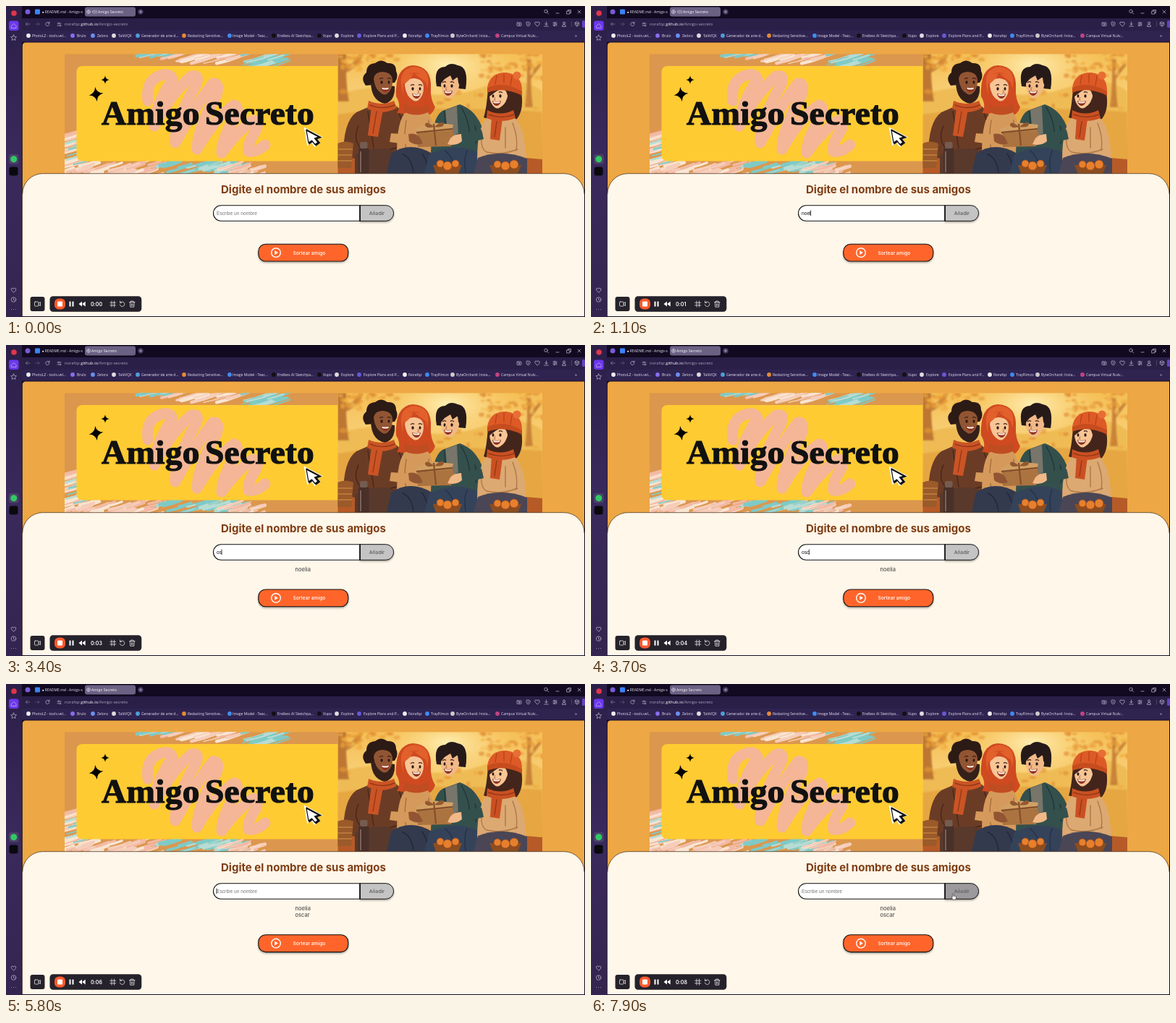
These frames come from a looping animation (800 px wide and 430 px high, 8 s). An HTML page:

```html
<!DOCTYPE html>
<html lang="es">
<head>
<meta charset="utf-8">
<title>Amigo Secreto</title>
<style>
html, body { margin: 0; width: 100%; height: 100%; overflow: hidden; background: #140d24; }
svg { display: block; width: 800px; height: 430px; }
text { white-space: pre; }
.ui { font: 5px "Open Sans", sans-serif; fill: #e9e5f2; }
.inter { font: 500 6.67px Inter, sans-serif; }
.field { font: 6.67px "Liberation Sans", Arial, sans-serif; }
.name { font-size: 7.5px; fill: #555; }
.line { fill: none; stroke: #c4bcd4; stroke-width: .7; stroke-linecap: round; stroke-linejoin: round; }
.rec { fill: none; stroke: #e4e2e6; stroke-width: .8; stroke-linecap: round; stroke-linejoin: round; }
.title { font: bold 47.4px "Liberation Serif", "Times New Roman", serif; letter-spacing: .3px; word-spacing: -5px; fill: #111; stroke: #111; stroke-width: 1.2; }
.fold { fill: none; stroke-width: 1.4; stroke-linecap: round; }
</style>
</head>
<body>
<svg viewBox="0 0 800 430">
<defs>
  <linearGradient id="side" x2="0" y2="1"><stop stop-color="#2b1f48"/><stop offset=".5" stop-color="#3a2a5d"/><stop offset="1" stop-color="#33244f"/></linearGradient>
  <linearGradient id="sky" x2="0" y2="1"><stop stop-color="#f5bf55"/><stop offset=".35" stop-color="#f8cf76"/><stop offset=".65" stop-color="#ecb04a"/><stop offset="1" stop-color="#d98a35"/></linearGradient>
  <radialGradient id="glow"><stop stop-color="#ffeeb2"/><stop offset="1" stop-color="#fbd67e" stop-opacity="0"/></radialGradient>
  <filter id="shadow" x="-10%" y="-20%" width="120%" height="160%"><feDropShadow dx="0" dy="1.6" stdDeviation="1.1" flood-opacity=".32"/></filter>
  <filter id="soft"><feGaussianBlur stdDeviation="1.2"/></filter>
  <clipPath id="artClip"><rect x="81" y="66.500" width="378" height="166"/></clipPath>
  <clipPath id="sceneClip"><rect x="458.500" y="66.500" width="282.500" height="166"/></clipPath>
  <g id="face">
    <path d="M-13-6Q-12-16 0-16Q13-15 13-3Q13 8 6 14Q2 17-2 14Q-11 9-13-6z" fill="currentColor"/>
    <path d="M-5-6q3-2.500 5-.5M6-6.500q2.500-2 5 .5" fill="none" stroke="#3b2018" stroke-width="1.300"/>
    <ellipse cx="-2" cy="-1.500" rx="1.600" ry="2.300" fill="#2b1813"/><ellipse cx="8" cy="-1.500" rx="1.400" ry="2.200" fill="#2b1813"/>
    <path d="M5 0l1.500 3.500-2 .5" fill="none" stroke="#9c5a35" stroke-width=".8"/>
    <path d="M-3 5q6 2 12 0-1 7-6 7-5-1-6-7z" fill="#8c2f20"/><path d="M-2 5.800q5 1.300 10 0l-.8 2.200q-4 1.200-8 0z" fill="#fff4e6"/>
  </g>
  <path id="star" d="M0-10Q1.300-1.300 10 0Q1.300 1.300 0 10Q-1.300 1.300-10 0Q-1.300-1.300 0-10z"/>
  <path id="pointer" d="M415 172l3 17 4.500-3 4.500 5.500 4-3-4.500-5.500 5.500-2z"/>
  <path id="heart" d="M0 3L-3.200-.300Q-3.700-3-1.600-3Q-.400-3 0-1.700Q.400-3 1.600-3Q3.700-3 3.200-.300z"/>
</defs>

<!-- browser -->
<rect width="800" height="430" fill="#140d24"/>
<path d="M0 17H800V52H0z" fill="#2a1f47"/>
<path d="M0 34H800V50H0z" fill="#2f2350"/>
<rect width="22" height="430" fill="url(#side)"/>
<path d="M22 17V0H800V17z" fill="#110a20"/>
<circle cx="11" cy="10" r="3.800" fill="#e2354b"/>
<rect x="4" y="20.500" width="13.500" height="13.500" rx="3" fill="#6c37ef"/>
<g class="line">
  <path d="M7.500 27.500l3.300-3 3.300 3v3h-6.600z"/>
  <path d="M10.600 40l1.200 2.500 2.700.3-2 1.900.5 2.700-2.400-1.300-2.400 1.300.5-2.700-2-1.900 2.700-.3z"/>
  <use href="#heart" x="10.500" y="393"/>
  <circle cx="10.500" cy="406" r="3.300"/><path d="M10.500 404v2.300l1.500.8"/>
  <path d="M7.500 419.500h.1M10.500 419.500h.1M13.500 419.500h.1"/>
</g>
<rect x="4" y="205" width="13.500" height="13.500" rx="3" fill="#4c4167"/><circle cx="10.700" cy="211.700" r="4.500" fill="#2fc963"/>
<rect x="4.500" y="222.500" width="12" height="12" rx="3" fill="#0a090d"/>

<circle cx="30" cy="8" r="3.500" fill="#765bd8"/>
<rect x="40" y="4.500" width="7" height="7" rx="1" fill="#3b82f6"/>
<text class="ui" x="49.500" y="10">● README.md - Amigo-s</text>
<rect x="109" y="1.500" width="70" height="13" rx="3" fill="#6a6183"/>
<g class="line"><circle cx="114" cy="8" r="2.600"/><path d="M111.500 8h5M114 5.500q-2 2.500 0 5q2-2.500 0-5"/></g>
<path id="speaker" class="line" d="M119.500 7v2h1l1.500 1.500v-5L120.500 7zM123.500 6.500q1 1.500 0 3M125 5.700q1.700 2.300 0 4.600"/>
<text id="tab" class="ui" y="10" style="font-size:5.200px;fill:#fff">Amigo Secreto</text>
<circle cx="186" cy="8" r="3.700" fill="#43385e"/>
<g class="line">
  <path d="M184.300 8h3.400M186 6.300v3.400"/>
  <circle cx="746" cy="7.300" r="2.200"/><path d="M747.700 9l2 2M760 10h4M775 7h4v4h-4zM776.500 7V5.500h4v4h-1.500M790 6l4 4M794 6l-4 4"/>
  <path opacity=".65" d="M33 25h-5.500M29.700 22.700L27.500 25l2.200 2.300"/><path opacity=".35" d="M40.500 25H46M43.800 22.700L46 25l-2.200 2.300"/>
  <path d="M59.500 23.500a2.600 2.600 0 1 0 .4 2.200M60 22v2h-2"/>
  <path d="M71 24h5M71 27h5M73 23v2M75 26v2"/>
  <rect x="706" y="23" width="6" height="4.500" rx=".8"/><circle cx="709" cy="25.200" r="1.100"/>
  <path d="M721.500 22l2.500 1v2q0 2-2.500 3-2.500-1-2.500-3v-2zM721.500 24v2"/>
  <use href="#heart" x="734" y="25"/>
  <path d="M746.500 22v4M744.700 24.300l1.800 1.900 1.800-1.900M743.700 28h5.600"/>
  <path d="M756 23h5M756 25h5M756 27h5M758 22.300v1.500M760 24.300v1.500M757.500 26.300v1.500"/>
  <circle cx="771" cy="23.500" r="1.500"/><path d="M768.500 28q0-2.500 2.500-2.500t2.500 2.500z"/>
  <path opacity=".3" d="M781.500 21.500v7"/>
  <path d="M789 22l2.700 1.300v3L789 28l-2.700-1.700v-3zM786.300 23.300l2.700 1.400 2.700-1.400M789 24.700V28"/>
</g>
<rect x="796" y="20" width="4" height="10" rx="1.500" fill="#6542c6"/>
<text class="ui" x="81" y="27.200" style="font-size:5.800px;fill:#aaa1bc">norafqz.<tspan fill="#fff">github.io</tspan>/Amigo-secreto</text>
<g id="bookmarks"></g>
<text class="ui" x="786" y="43" style="font-size:6px">»</text>

<!-- page -->
<path d="M21.800 430V49.500H800V430z" fill="#140d24"/>
<path d="M22.800 429V55q0-4.500 4.500-4.500H799V429z" fill="#eda744"/>
<g clip-path="url(#artClip)">
  <rect x="81" y="66" width="378" height="167" fill="#dc974e"/>
  <g id="brush" fill="none" stroke-linecap="round"></g>
  <path d="M106 83H459V214.500H106q-8.500 0-8.500-8.500V91.500q0-8.500 8.500-8.500z" fill="#ffcb32"/>
  <path d="M196 131Q193 106 209 98T230 101Q205 140 205 166Q227 122 256 97Q269 94 262 110Q232 163 234 189Q261 139 286 107Q296 106 291 123Q264 171 264 198Q290 153 315 137Q323 139 317 153Q298 184 298 203Q322 170 342 158Q351 160 345 173Q333 190 335 201Q346 203 358 192" fill="none" stroke="#f4b697" stroke-width="15" stroke-linecap="round" stroke-linejoin="round"/>
  <use href="#star" transform="translate(124.500 122) rotate(-8)"/><use href="#star" transform="translate(137 102) scale(.58)"/>
  <text class="title" x="132" y="163.800">Amigo Secreto</text>
  <use href="#pointer" fill="#fff" stroke="#fff" stroke-width="5"/>
  <use href="#pointer" x="1.500" y=".5" fill="#111" stroke="#111" stroke-width="2.600"/>
  <use href="#pointer" fill="#fff" stroke="#111" stroke-width="1.300"/>
</g>

<g clip-path="url(#sceneClip)">
  <rect x="458" y="66" width="283" height="167" fill="url(#sky)"/>
  <ellipse cx="610" cy="82" rx="95" ry="48" fill="url(#glow)"/>
  <g filter="url(#soft)">
    <path d="M458 122Q510 106 560 118T660 112T741 118V232H458z" fill="#efbb55"/>
    <path d="M458 150Q540 136 741 146V232H458z" fill="#e6a742"/>
    <path d="M458 66h12q-1 42 4 66h-16z" fill="#bd7730"/><path d="M470 84q12-5 18-18h6q-6 18-24 26z" fill="#c8843a"/>
    <path d="M717 140q4-32 3-74h6q-2 46 2 74z" fill="#c98339"/><path d="M722 96l15-17 3 2-17 23z" fill="#c98339"/>
    <g id="leaves"></g>
  </g>
  <path d="M458 212Q600 198 741 212V232H458z" fill="#b65b27"/>
  <!-- left man -->
  <path d="M466 207Q466 160 484 147L507 137H537Q551 145 556 168L558 204Q516 222 466 207z" fill="#6b3c25"/>
  <path class="fold" d="M487 166q-9 20 5 32q22 8 64-7M500 146l8 50M543 148q6 14 6 30" stroke="#45261a"/>
  <path d="M482 206Q520 188 547 205L540 232H482z" fill="#59392c"/>
  <path d="M497 110q-8-11 1-18q0-12 12-13q8-7 17 0q12-1 12 11q4 8-2 16z" fill="#2c1a15"/>
  <path d="M504 106Q505 132 524 135Q538 131 537 111z" fill="#35201a"/>
  <use href="#face" x="521" y="107" color="#925533"/>
  <path d="M508 118q4 14 17 14q8-1 9-11q-2 8-8 8q-10 0-18-11z" fill="#35201a"/>
  <path d="M501 131q18 8 35 0l4 10q-20 11-41 1zM505 140l16 3-7 38-14-2z" fill="#cb5425"/>
  <path class="fold" d="M503 137q18 7 34 0M512 146l-5 30" stroke="#963817"/>
  <!-- red-haired woman -->
  <path d="M540 148Q547 138 539 125Q537 84 562 82Q589 83 587 115Q586 128 593 140Q589 151 580 152z" fill="#cf4a20"/>
  <path d="M540 205Q540 156 553 147L582 146Q594 160 592 202z" fill="#d59a5b"/>
  <path class="fold" d="M553 158q-4 25 0 40M584 158l2 30" stroke="#a86e3b"/>
  <use href="#face" x="564" y="116" color="#f8c596"/>
  <path d="M549 123Q545 93 564 92Q580 93 582 115Q589 86 564 84Q538 87 549 123z" fill="#e2602b"/>
  <path d="M563 93q-5 11-14 15l2-13zM564 93q9 8 18 13l-4-11z" fill="#e2602b"/>
  <path d="M550 135q16 9 33 0l2 11q-18 9-36 0z" fill="#c04c22"/>
  <path d="M532 204Q558 186 589 204L593 232H526z" fill="#333a4e"/>
  <path class="fold" d="M548 205q12 4 15 25M575 204q8 12 8 26" stroke="#222839"/>
  <!-- dark-haired man -->
  <path d="M587 204Q588 154 603 145L627 136Q650 144 659 171L661 207z" fill="#34504d"/>
  <path d="M607 144l16-6 2 44-14 2z" fill="#78756a"/>
  <path class="fold" d="M629 140q15 26 10 48M606 145l2 38M648 166q4 14 1 24" stroke="#1f3536"/>
  <path d="M595 111Q590 84 607 84Q614 77 624 82Q640 84 635 115z" fill="#261a19"/>
  <use href="#face" transform="translate(614 112) scale(-1 1)" color="#f1b987"/>
  <path d="M600 108Q596 92 611 87Q631 88 629 115L625 106L624 98L617 103L614 96L606 101z" fill="#261a19"/>
  <path d="M585 205Q624 186 657 205L652 232H578z" fill="#34435a"/>
  <path class="fold" d="M607 200q12 10 14 30M637 200q-5 12-2 30" stroke="#243048"/>
  <!-- woman with a woollen hat -->
  <path d="M666 114Q664 142 660 154Q682 164 706 156Q717 142 711 114z" fill="#43251b"/>
  <path d="M651 213Q651 164 667 152H699Q717 162 719 214z" fill="#dca973"/>
  <path class="fold" d="M658 176q-4 20 6 26q20 5 43-4M700 162q8 20 5 38M690 168v28" stroke="#ad7847"/>
  <use href="#face" transform="translate(681 126) scale(-1 1)" color="#f8c594"/>
  <path d="M667 126Q667 110 680 109Q698 110 698 138L691 118L686 113L676 119z" fill="#43251b"/>
  <path d="M665 113Q668 92 691 92Q714 95 713 119Q690 104 665 113z" fill="#dd5a26"/><circle cx="706" cy="96" r="5.500" fill="#e86d35"/>
  <path d="M665 113q23-10 48 5v6q-25-13-48-4z" fill="#c64c1e"/>
  <path class="fold" d="M678 96l-2 12M688 94v12M699 97l-2 13" stroke="#bb431b"/>
  <path d="M665 144q18 9 36 0l3 11q-20 8-40 0zM671 153l15 3-4 30-13-2z" fill="#ca5022"/>
  <path class="fold" d="M667 150q18 7 35 0M678 160l-3 21" stroke="#963817"/>
  <path d="M652 210Q685 197 720 211V232H646z" fill="#4a4655"/>
  <!-- gift -->
  <path d="M532 176l30 2 6 9-10 5-28-4z" fill="#d59a5b"/><path d="M657 171l-35 6-4 10 12 4 30-7z" fill="#34504d"/>
  <path d="M568 170l48-5 3 16-4 13-46 1z" fill="#ab733f"/><path d="M566 170l22-9 30 3-2 8-48 4z" fill="#d2a064"/>
  <path d="M591 163l3 30M567 175l50-5" stroke="#86502a" stroke-width="2.300"/>
  <path d="M592 167q-13-10-13-2 2 5 13 2q12-11 13-3-2 5-13 3z" fill="#93592f"/>
  <path d="M556 177q10-2 16 5l4 8q-10 4-19-3z" fill="#925533"/><path d="M629 177q-10 0-15 6l-4 8q12 3 20-4z" fill="#f1b987"/>
  <path d="M458 190q11-5 22 0l-3 34h-19z" fill="#9a5a2a"/><path d="M458 198h21M458 206h20M458 214h20" stroke="#c3813f" stroke-width="1.500"/>
  <rect x="487" y="196" width="14.500" height="36" rx="3" fill="#493029"/><rect x="489" y="188" width="10.500" height="9" rx="2" fill="#745c50"/><path d="M490 201v29" stroke="#8c746a" stroke-width="1.500"/>
  <path d="M590 220h40l-5 12h-31zM668 220h44l-5 12h-34z" fill="#8c4d20"/>
  <g fill="#e6802d" stroke="#a8481a" stroke-width=".7"><circle cx="600" cy="218" r="5"/><circle cx="610" cy="221" r="6"/><circle cx="621" cy="218" r="5"/><circle cx="679" cy="219" r="5"/><circle cx="690" cy="221" r="6"/><circle cx="702" cy="219" r="6"/></g>
</g>

<path d="M22.800 429V260A28 28 0 0 1 50.800 231.700H771A28 28 0 0 1 799 260V429z" fill="#fff7ea"/>
<path d="M22.800 260A28 28 0 0 1 50.800 231.700H771A28 28 0 0 1 799 260" fill="none" stroke="#3b2411" stroke-width=".7"/>
<text x="411" y="258.700" text-anchor="middle" style="font:700 15px Inter,sans-serif" fill="#7f3d13">Digite el nombre de sus amigos</text>

<path id="add" filter="url(#shadow)" d="M489 275.700H524.800a10.800 10.800 0 0 1 0 21.600H489z" fill="#c4c4c4" stroke="#111" stroke-width="1"/>
<text class="inter" x="512.300" y="288.800" text-anchor="middle" fill="#656565" style="font-weight:600">Añadir</text>
<path d="M489 275.700H297.300a10.800 10.800 0 0 0 0 21.600H489z" fill="#fff" stroke="#111" stroke-width="1.100"/>
<path id="divider" d="M489 275.500v22" stroke-width="1.500"/>
<text id="input" class="field" x="291" y="288.500"></text>
<path id="caret" d="M0 282.500v7.500" stroke="#111" stroke-width=".8"/>
<text id="first" x="399.500" y="312.700" class="inter name"></text>
<text id="second" x="399.500" y="321.700" class="inter name"></text>
<g id="draw">
  <rect filter="url(#shadow)" x="348.800" y="329.200" width="124" height="23.800" rx="10" fill="#ff652b" stroke="#111" stroke-width="1.100"/>
  <circle cx="373" cy="341" r="6.300" fill="none" stroke="#fff" stroke-width="1.400"/><path d="M371.300 338l4.600 3-4.600 3z" fill="#fff"/>
  <text class="inter" x="396.500" y="343.500" fill="#fff">Sortear amigo</text>
</g>

<!-- recorder -->
<g fill="#25222b"><rect x="33.500" y="402" width="20" height="20" rx="3"/><rect x="60.500" y="401.200" width="126.800" height="21.600" rx="4.500"/></g>
<g class="rec"><rect x="39.500" y="409" width="5.500" height="6" rx=".8"/><path d="M45 411l2.500-1.500v5L45 413"/></g>
<rect x="67" y="404.500" width="15" height="15" rx="6" fill="#ff5a2d"/><rect x="71" y="408.500" width="7" height="7" rx="1" fill="#fff"/>
<path d="M87.500 408.500h2v7h-2zM91.500 408.500h2v7h-2zM105 408.500v7l-4.500-3.500zM109.700 408.500v7l-4.500-3.500z" fill="#fff"/>
<text id="clock" class="inter" x="117" y="414.600" fill="#fff" style="font-weight:600;font-size:7px"></text>
<g class="rec">
  <path d="M146 408v8M149.500 408v8M143.700 410.200h8M143.700 413.800h8"/>
  <path d="M158 410a3.300 3.300 0 1 1-.7 3M157.500 408v2.300h2.300"/>
  <path d="M170.500 409.500h7.500M172.500 409.500v-1.500h3.500v1.500M171.300 409.500l.5 6.700h5l.5-6.700M173.500 411.500v3M175.200 411.500v3"/>
</g>
<g id="mouse" stroke="#222" stroke-width=".6" fill="#fff">
  <path id="arrow" d="M0 0v8.500l2-1.800 1.400 3 1.400-.7-1.400-2.900h2.700z"/>
  <path id="hand" d="M-.7 0q.9-.8 1.500 0v3l3 .6q1 .3.800 1.500l-.7 3H.2l-2.400-3.200q.3-1 1.500 0z"/>
</g>
</svg>
<script>
const $ = id => document.getElementById(id);

let seed = 11;
const rand = (lo, hi) => {
  seed = (seed * 16807) % 2147483647;
  return lo + (hi - lo) * seed / 2147483647;
};
const pick = list => list[Math.floor(rand(0, list.length))];
const fill = (id, count, make) => {
  $(id).innerHTML += Array.from({ length: count }, make).join('');
};

const bookmarks = [
  [31, 36, '#eee', 'PhotoLZ - tools.vel...'], [92, 98, '#8b6cf0', 'Brulo'], [120, 126, '#6a8ff0', 'Zelora'],
  [149, 155, '#ddd', 'TalkVQX'], [182, 187, '#4f9dd8', 'Generador de arte d...'], [246, 251, '#e58a35', 'Redacting Sensitive...'],
  [309, 313, '#3f8df0', 'Image Model - Teac...'], [370, 375, '#111', 'Endless AI Sketchpa...'], [433, 438, '#111', 'Vupo'],
  [457, 463, '#ddd', 'Explore'], [488, 494, '#6759d8', 'Explore Plans and P...'], [551, 556, '#eee', 'Norafqz'],
  [582, 587, '#3d8bf2', 'TrayFlimzo'], [617, 622, '#ccc', 'ByteOrchard: Insta...'], [679, 684, '#c34482', 'Campus Virtual Nulv...']
];
fill('bookmarks', bookmarks.length, (_, i) => {
  const [dot, x, color, label] = bookmarks[i];
  return `<circle cx="${dot}" cy="41" r="2.900" fill="${color}"/><text class="ui" x="${x}" y="43">${label}</text>`;
});

const pinks = ['#f3b9a4', '#f6cdb9', '#f8e5d2'];
const teals = ['#7fcac6', '#7fcac6', '#b7dcd3'];
const paint = (x0, x1, y0, y1, count, colors) => fill('brush', count, () => {
  const x = rand(x0, x1), y = rand(y0, y1), len = rand(14, 36);
  return `<path d="M${x} ${y}q${len / 2} ${-len * .1} ${len} ${-len * .3}" stroke="${pick(colors)}" stroke-width="${rand(1, 5)}"/>`;
});
paint(215, 310, 67, 80, 30, pinks);
paint(325, 365, 68, 86, 24, teals);
paint(180, 230, 66, 72, 10, teals);
paint(70, 85, 178, 236, 30, pinks);
paint(74, 100, 190, 222, 8, teals);
paint(85, 200, 219, 238, 42, pinks);
paint(200, 310, 219, 236, 36, teals);
paint(290, 345, 224, 238, 18, pinks);

const leaf = (x0, x1, y0, y1) => () =>
  `<ellipse cx="${rand(x0, x1)}" cy="${rand(y0, y1)}" rx="${rand(2, 6)}" ry="${rand(1.5, 4)}" fill="${pick(['#e79a35', '#efab3e', '#f6c25c', '#de8a30'])}" opacity=".65"/>`;
fill('leaves', 50, leaf(458, 540, 64, 88));
fill('leaves', 50, leaf(655, 741, 64, 100));
fill('leaves', 25, leaf(458, 741, 118, 165));

// [start, typed text, focused part, names in the list]
const steps = [[0, '', '', 0]];
const type = (word, times, count) =>
  times.forEach((at, i) => steps.push([at, word.slice(0, i + 1), 'input', count]));
type('noelia', [700, 800, 1000, 1100, 1400, 1700], 0);
steps.push([2300, 'noelia', 'button', 0], [2800, '', 'input', 1]);
type('oscar', [3100, 3300, 3700, 4200, 4700], 1);
steps.push([4900, 'oscar', 'button', 1], [5400, '', 'input', 2]);

const ticks = [700, 1700, 2700, 3700, 4700, 5600, 6600, 7600];
const show = (id, on) => { $(id).style.visibility = on ? 'visible' : 'hidden'; };
const put = (id, text) => { if ($(id).textContent !== text) $(id).textContent = text; };

function render(t) {
  const [since, text, focus, count] = steps.findLast(step => step[0] <= t);
  put('input', text || 'Escribe un nombre');
  $('input').setAttribute('fill', text ? '#111' : '#777');
  const end = text ? $('input').getComputedTextLength() : 0;
  $('caret').setAttribute('transform', `translate(${291 + end} 0)`);
  show('caret', focus === 'input' && Math.floor((t - since) / 500) % 2 === 0);
  $('divider').setAttribute('stroke', focus === 'button' ? '#465273' : '#111');

  put('first', count > 0 ? 'noelia' : '');
  put('second', count > 1 ? 'oscar' : '');
  $('draw').setAttribute('transform', `translate(0 ${count * 8.8})`);
  put('clock', '0:0' + ticks.filter(at => at <= t).length);

  show('speaker', t < 1900);
  $('tab').setAttribute('x', t < 1900 ? 127 : 118);

  const p = Math.min(1, Math.max(0, (t - 7300) / 500));
  const ease = 1 - (1 - p) ** 3;
  const x = 590 - 90 * ease, y = 375 - 85 * ease;
  const hover = x < 536 && y < 297;
  $('mouse').setAttribute('transform', `translate(${x} ${y})`);
  show('arrow', t >= 7300 && !hover);
  show('hand', hover);
  $('add').setAttribute('fill', hover ? '#9c9a9c' : '#c4c4c4');
}

const start = performance.now();
function frame() {
  render((performance.now() - start) % 8000);
  requestAnimationFrame(frame);
}
frame();
</script>
</body>
</html>
```
